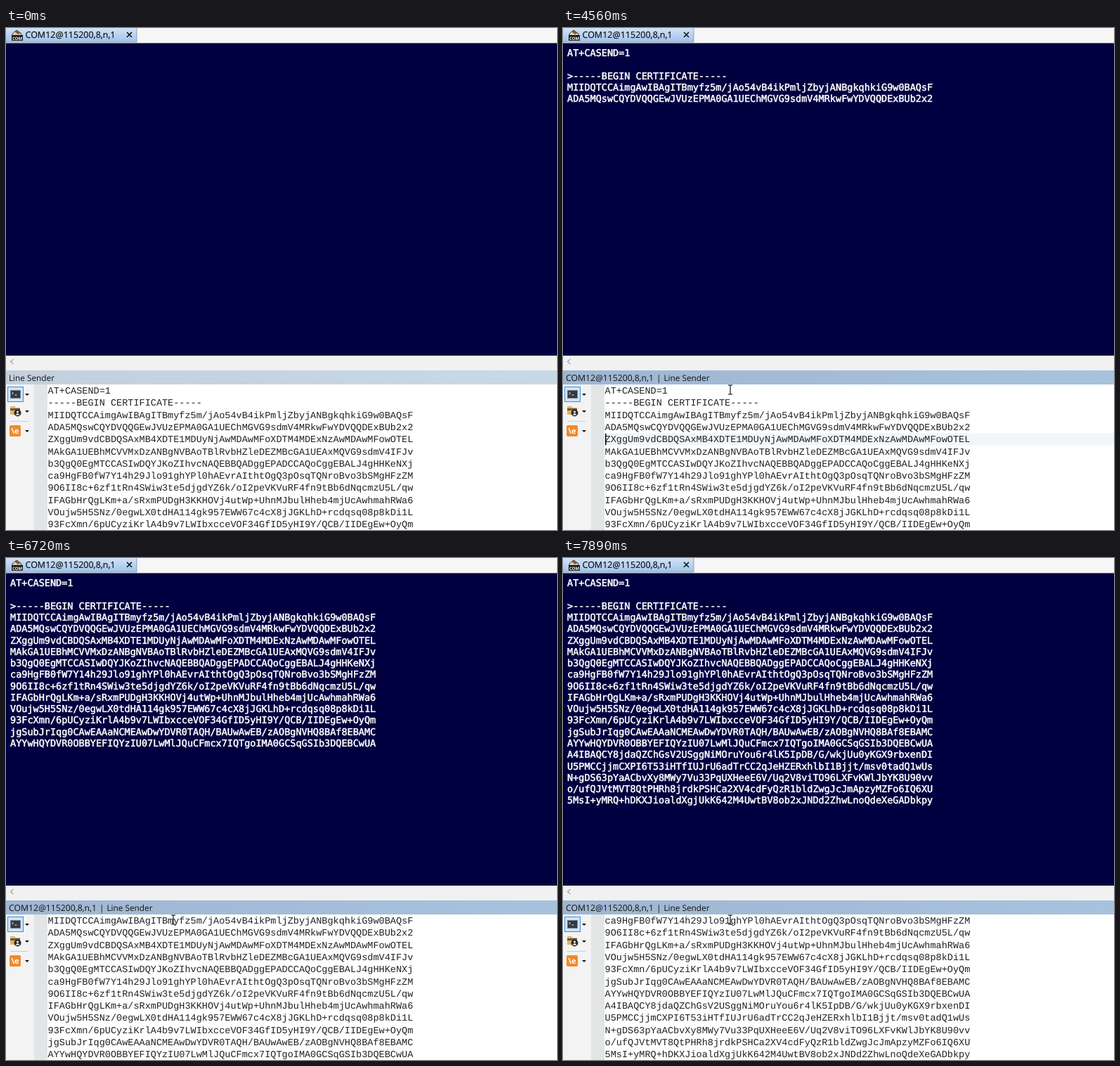
Animation of 784 by 714 pixels, one loop 8 s. Source, as an HTML page:

```html
<!DOCTYPE html>
<html lang="en">
<head>
<meta charset="utf-8">
<title>Line sender</title>
<style>
  html, body { margin: 0; width: 100%; height: 100%; overflow: hidden; background: #fff; }
  svg { display: block; width: 784px; height: 714px; }
  text { text-rendering: geometricPrecision; white-space: pre; }
  .ui { font-family: "Open Sans", "Noto Sans", sans-serif; fill: #111; }
  #term { font: 13.5px "DejaVu Sans Mono", monospace; fill: #fff; stroke: #fff; stroke-width: .5px; }
  #sender { font: 13.54px "Liberation Mono", monospace; fill: #222; }
</style>
</head>
<body>
<svg viewBox="0 0 784 714">
  <defs>
    <linearGradient id="tab" x2="0" y2="1">
      <stop stop-color="#d3e3f6"/><stop offset="1" stop-color="#9fc2ea"/>
    </linearGradient>
    <linearGradient id="idle">
      <stop stop-color="#c3cfdd"/><stop offset="1" stop-color="#c8d9e6"/>
    </linearGradient>
    <linearGradient id="active">
      <stop stop-color="#9fb6d2"/><stop offset="1" stop-color="#a8c2dd"/>
    </linearGradient>
    <path id="drop" d="M0 0h6l-3 3z" fill="#111"/>
  </defs>

  <!-- tab bar -->
  <rect width="784" height="22" fill="#f6f6f7"/>
  <path d="M0 0H186V20H0z" fill="url(#tab)"/>
  <path d="M186 0V20H0" fill="none" stroke="#8c9fb8"/>
  <path d="M9 8l6-5 7 5-2 5H9z" fill="#d9cdb8" stroke="#57483a"/>
  <path d="M12 5l4-2 5 4-4 2z" fill="#7a5c40"/>
  <rect x="8" y="10" width="16" height="8" fill="#1c1c1c"/>
  <text x="16" y="16.5" text-anchor="middle" class="ui" font-size="6" font-weight="bold" style="fill:#fff">COM</text>
  <text x="27.5" y="14" class="ui" font-size="12.5" stroke="#111" stroke-width=".2">COM12@115200,8,n,1</text>
  <path d="M172 6l7 7m0-7l-7 7" stroke="#111" stroke-width="1.6"/>

  <!-- terminal -->
  <rect y="21.500" width="784" height="444.500" fill="#000040"/>
  <g id="term"></g>
  <rect y="466" width="784" height="21" fill="#f1f1f2"/>
  <path d="M10.500 471l-4 3.500 4 3.500" fill="none" stroke="#a5a5a8" stroke-width="1.300"/>

  <!-- sender panel -->
  <rect id="bar" y="487" width="784" height="20"/>
  <g class="ui" font-size="11.800">
    <text id="idleTitle" x="4" y="502">Line Sender</text>
    <text id="activeTitle" y="502"><tspan x="4" font-size="12.2">COM12@115200,8,n,1</tspan><tspan x="133">|</tspan><tspan x="143.5">Line Sender</tspan></text>
  </g>
  <rect y="507" width="784" height="207" fill="#fff"/>
  <rect y="507" width="40" height="207" fill="#f3f3f4"/>
  <rect x="40" y="507" width="19" height="207" fill="#e3e4e5"/>

  <rect x="2.500" y="510.500" width="22" height="21" fill="#cfe5f8" stroke="#3b8fd6"/>
  <rect x="6.500" y="515.500" width="14" height="11" fill="#343a42" stroke="#777d85"/>
  <path d="M8.500 518l2 1.500-2 1.500m4 1h3" fill="none" stroke="#e8e8e8"/>
  <path d="M6 538h6l2 2h6v10H6z" fill="#e3b566"/>
  <path d="M6 541h14v3H6z" fill="#6d5836"/>
  <circle cx="16.500" cy="547.500" r="5" fill="#2b2b2b"/>
  <circle cx="16.500" cy="546" r="1.500" fill="#fff"/>
  <path d="M13.500 550.500q3-4.500 6 0z" fill="#fff"/>
  <path d="M6 559.500h26" stroke="#cfcfd1"/>
  <rect x="5" y="565" width="16" height="16" rx="2" fill="#f08a2c"/>
  <text x="13" y="577" text-anchor="middle" class="ui" font-size="11" font-weight="bold" style="fill:#fff">\e</text>
  <use href="#drop" x="27" y="520"/>
  <use href="#drop" x="27" y="544"/>
  <use href="#drop" x="27" y="572"/>

  <rect id="row" x="59" width="725" height="17.300" fill="#f2f6f9"/>
  <g id="sender"></g>
  <rect id="caret" width="1.500" height="16.500" fill="#000"/>

  <g id="mouse">
    <path id="beam" d="M-3-6.500h2.200l.8.800.8-.8H3M0-6V6M-3 6.500h2.200l.8-.8.8.8H3" fill="none" stroke="#000" stroke-width="1.100"/>
    <path id="arrow" d="M0 0v16l4-3.500 2.500 6 2.500-1-2.500-6H12z" fill="#fff" stroke="#000"/>
  </g>
</svg>
<script>
const LOOP = 8000, ROWS = 12, CHAR = 8.125;
const TERM_STEP = 16.27, SEND_STEP = 17.27, SEND_TOP = 507.2;

const lines = ["AT+CASEND=1", "-----BEGIN CERTIFICATE-----", ...`
MIIDQTCCAimgAwIBAgITBmyfz5m/jAo54vB4ikPmljZbyjANBgkqhkiG9w0BAQsF
ADA5MQswCQYDVQQGEwJVUzEPMA0GA1UEChMGVG9sdmV4MRkwFwYDVQQDExBUb2x2
ZXggUm9vdCBDQSAxMB4XDTE1MDUyNjAwMDAwMFoXDTM4MDExNzAwMDAwMFowOTEL
MAkGA1UEBhMCVVMxDzANBgNVBAoTBlRvbHZleDEZMBcGA1UEAxMQVG9sdmV4IFJv
b3QgQ0EgMTCCASIwDQYJKoZIhvcNAQEBBQADggEPADCCAQoCggEBALJ4gHHKeNXj
ca9HgFB0fW7Y14h29Jlo91ghYPl0hAEvrAIthtOgQ3pOsqTQNroBvo3bSMgHFzZM
9O6II8c+6zf1tRn4SWiw3te5djgdYZ6k/oI2peVKVuRF4fn9tBb6dNqcmzU5L/qw
IFAGbHrQgLKm+a/sRxmPUDgH3KKHOVj4utWp+UhnMJbulHheb4mjUcAwhmahRWa6
VOujw5H5SNz/0egwLX0tdHA114gk957EWW67c4cX8jJGKLhD+rcdqsq08p8kDi1L
93FcXmn/6pUCyziKrlA4b9v7LWIbxcceVOF34GfID5yHI9Y/QCB/IIDEgEw+OyQm
jgSubJrIqg0CAwEAAaNCMEAwDwYDVR0TAQH/BAUwAwEB/zAOBgNVHQ8BAf8EBAMC
AYYwHQYDVR0OBBYEFIQYzIU07LwMlJQuCFmcx7IQTgoIMA0GCSqGSIb3DQEBCwUA
A4IBAQCY8jdaQZChGsV2USggNiMOruYou6r4lK5IpDB/G/wkjUu0yKGX9rbxenDI
U5PMCCjjmCXPI6T53iHTfIUJrU6adTrCC2qJeHZERxhlbI1Bjjt/msv0tadQ1wUs
N+gDS63pYaACbvXy8MWy7Vu33PqUXHeeE6V/Uq2V8viTO96LXFvKWlJbYK8U90vv
o/ufQJVtMVT8QtPHRh8jrdkPSHCa2XV4cdFyQzR1bldZwgJcJmApzyMZFo6IQ6XU
5MsI+yMRQ+hDKXJioaldXgjUkK642M4UwtBV8ob2xJNDd2ZhwLnoQdeXeGADbkpy
`.trim().split("\n")];

// Moment each line is sent to the terminal
const sendAt = [2470, 3870, 4250, 4560, 4790, 5020, 5190, 5420, 5650, 5880,
  6030, 6260, 6490, 6720, 6950, 7200, 7430, 7660, 7890];
const PROMPT = 2620, CLICK = 1370, MOVE = 350, SETTLE = 1450;
const caretOff = [[2000, 2470], [3170, 3720]];

const $ = id => document.getElementById(id);
const show = (el, on) => el.setAttribute("visibility", on ? "visible" : "hidden");

function addText(parent, x, y, str = "") {
  const el = document.createElementNS("http://www.w3.org/2000/svg", "text");
  el.setAttribute("x", x);
  el.setAttribute("y", y);
  el.textContent = str;
  return parent.appendChild(el);
}

const termY = row => 40.2 + row * TERM_STEP;
const termLines = lines.map((s, i) =>
  i === 1 ? addText($("term"), 6 + CHAR, termY(2), s)
          : addText($("term"), 6, termY(i ? i + 1 : 0), s));
const prompt = addText($("term"), 6, termY(2), ">");
const sendLines = Array.from({ length: ROWS }, (_, i) =>
  addText($("sender"), 59.6, 520.2 + i * SEND_STEP));

function drawMouse(t) {
  show($("mouse"), t >= MOVE);
  const k = Math.min(12, Math.floor((t - MOVE) / 92.7) + 1) / 12;
  const ease = 1 - (1 - k) ** 2;
  const settled = t >= SETTLE;
  const x = settled ? 238 : 775 - 541 * ease;
  const y = settled ? 514.5 : 436 + 77 * ease;
  const overText = y > 507;
  $("mouse").setAttribute("transform", `translate(${x} ${y})`);
  $("beam").setAttribute("display", overText ? "inline" : "none");
  $("arrow").setAttribute("display", overText ? "none" : "inline");
}

function render(t) {
  const sent = sendAt.filter(s => t >= s).length;
  const focused = t >= CLICK;
  const top = Math.max(0, sent - ROWS);

  termLines.forEach((el, i) => show(el, i < sent));
  show(prompt, t >= PROMPT);
  sendLines.forEach((el, i) => {
    const s = lines[top + i];
    if (el.textContent !== s) el.textContent = s;
  });

  $("bar").setAttribute("fill", focused ? "url(#active)" : "url(#idle)");
  show($("idleTitle"), !focused);
  show($("activeTitle"), focused);

  // The caret waits on the next line, which may lie below the view
  const inView = focused && sent < ROWS;
  const y = SEND_TOP + sent * SEND_STEP;
  const blinkedOff = caretOff.some(([a, b]) => t >= a && t < b);
  $("row").setAttribute("y", y);
  $("caret").setAttribute("y", y + 0.5);
  $("caret").setAttribute("x", sent ? 60 : 149);
  show($("row"), inView);
  show($("caret"), inView && !blinkedOff);
  drawMouse(t);
}

const start = performance.now();
function tick() {
  render((performance.now() - start) % LOOP);
  requestAnimationFrame(tick);
}
render(0);
requestAnimationFrame(tick);
</script>
</body>
</html>
```
